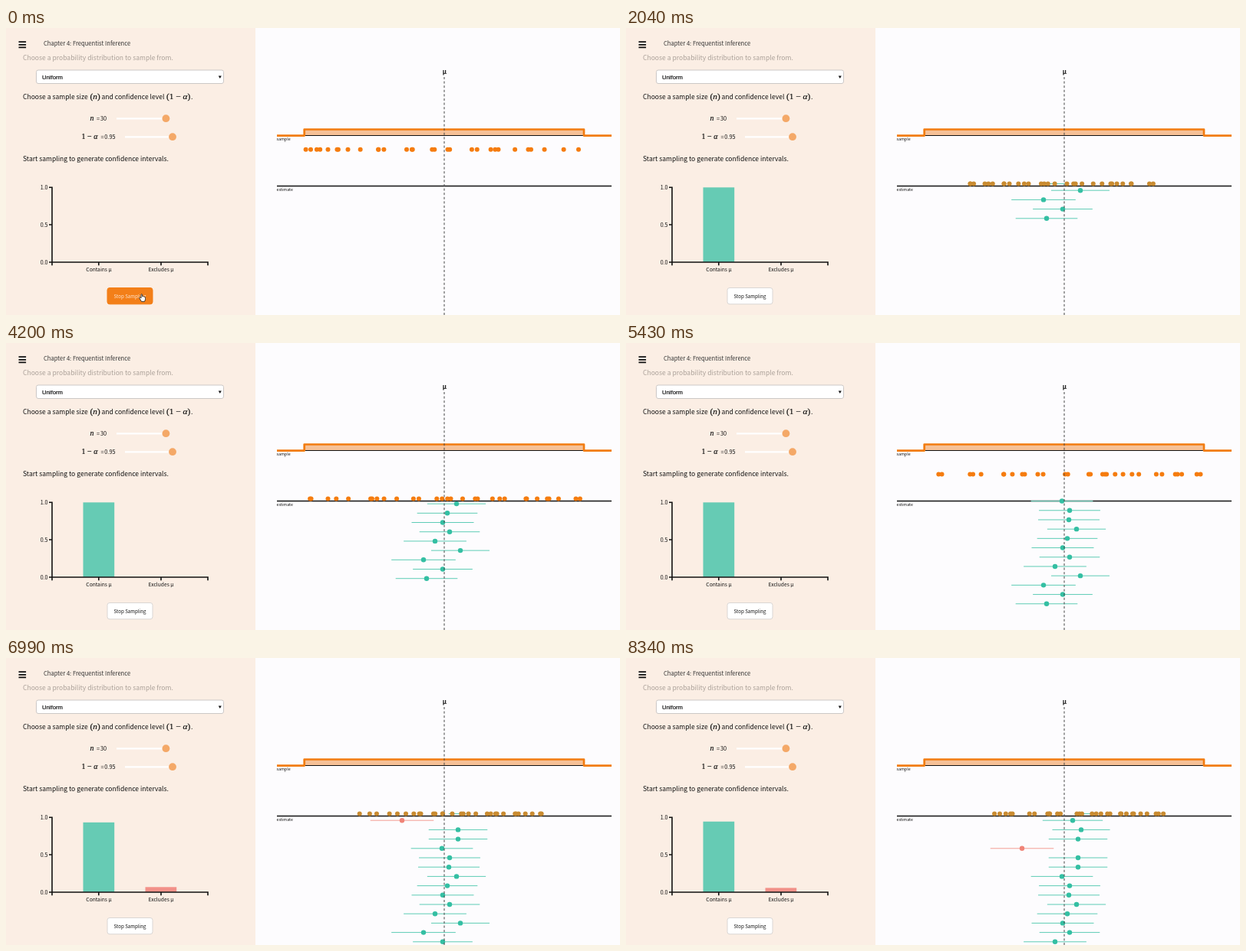
Write an HTML page with a canvas that moves like this. It is 800 px wide and 375 px high and loops after 8370 ms.

```html
<!DOCTYPE html>
<html lang="en">
<head>
<meta charset="utf-8">
<title>Confidence intervals</title>
<style>
html, body { margin: 0; width: 100%; height: 100%; overflow: hidden; background: #fdfcfe; }
svg, canvas { position: absolute; left: 0; top: 0; width: 800px; height: 375px; }
text { font: 500 8.57px 'Noto Sans CJK SC', 'Noto Sans CJK JP', 'Noto Sans', sans-serif; fill: #111; }
.light { font-weight: 400; }
.math { font: 11.3px 'Liberation Serif', serif; stroke: #111; stroke-width: .2; }
.math .v { font-style: italic; }
.value { font-size: 7.3px; word-spacing: -.8px; }
.tick { font-size: 7.1px; }
.small { font-size: 6.7px; }
.tiny { font-size: 5.3px; }
.mid { text-anchor: middle; }
.end { text-anchor: end; }
.line { fill: none; stroke: #111; stroke-width: 1.6; }
</style>
</head>
<body>
<svg viewBox="0 0 800 375">
  <rect width="325" height="375" fill="#fbeee4"/>
  <path d="M16.5 18.2h9.6m-9.6 3.6h9.6m-9.6 3.6h9.6" class="line" style="stroke-width:1.8"/>
  <text x="49" y="23.4" class="light" style="font-size:7.6px;fill:#333">Chapter 4: Frequentist Inference</text>
  <text x="22" y="41.5" class="light" style="fill:#aba199">Choose a probability distribution to sample from.</text>
  <rect x="39.5" y="55" width="244" height="17.5" rx="2.5" fill="#fff" stroke="#ccc8c6"/>
  <text x="47" y="66.5" style="font:7.7px 'Liberation Sans',sans-serif;stroke:#111;stroke-width:.2">Uniform</text>
  <path d="M276.8 62.6h4l-2 3.4z" fill="#111"/>

  <text x="22" y="93">Choose a sample size</text>
  <text x="109.6" y="93.3" class="math">(<tspan class="v">n</tspan>)</text>
  <text x="124.5" y="93">and confidence level</text>
  <text x="209" y="93.3" class="math">(1 − <tspan class="v">α</tspan>)</text>
  <text x="241" y="93">.</text>
  <text x="109.5" y="121" class="math" style="font-size:10px"><tspan class="v">n</tspan></text>
  <text x="131" y="120.8" class="value end">= 30</text>
  <text x="98.5" y="145" class="math" style="font-size:10px">1 − <tspan class="v">α</tspan></text>
  <text x="142.5" y="144.6" class="value end">= 0.95</text>
  <path d="M144 118.3h64M155 142.3h62" stroke="#fff" stroke-width="2.2"/>
  <circle cx="208.4" cy="118.2" r="4.9" fill="#f4a867"/>
  <circle cx="217" cy="142.2" r="4.9" fill="#f4a867"/>
  <text x="22" y="174">Start sampling to generate confidence intervals.</text>

  <rect id="hit" x="100.5" width="40.7" fill="#66cbb4"/>
  <rect id="miss" x="181.5" width="40.7" fill="#f39189"/>
  <path class="line" d="M56 208.3h4V306M56 257h4M56 306H263v4.3M60 306v4.3M120.8 306v4.3M202 306v4.3"/>
  <text x="54.5" y="210.8" class="tick end">1.0</text>
  <text x="54.5" y="259.6" class="tick end">0.5</text>
  <text x="54.5" y="308.6" class="tick end">0.0</text>
  <text x="121" y="318" class="small mid">Contains µ</text>
  <text x="202" y="318" class="small mid">Excludes µ</text>

  <rect id="button" x="132" y="339.5" width="59" height="21.3" rx="3"/>
  <text id="label" x="161.5" y="352.6" class="mid" style="font-size:6.15px">Stop Sampling</text>
  <path id="hand" d="M173.6 352.5l1.2-.8 1.2 1.2v-4.6q.8-1.2 1.6 0v2.5q1-.7 1.5.2 1-.5 1.4.4 1-.2 1.1.8v2.6l-1.1 2.6h-4z" fill="#fff" stroke="#111" stroke-width=".8"/>

  <path d="M388.5 140.5v-8H753v8z" fill="#f6c197"/>
  <path d="M353 140.5H789" stroke="#111"/>
  <path d="M353 140.6h35.7v-8.1H753v8.1h36" fill="none" stroke="#f27c10" stroke-width="2.7" stroke-linejoin="round"/>
  <path class="line" d="M353 206.5H789"/>
  <text x="352.5" y="147" class="tiny">sample</text>
  <text x="352.5" y="212.5" class="tiny">estimate</text>
  <text x="571.3" y="59.5" class="mid" style="font-size:8px;font-weight:700">µ</text>
</svg>
<canvas id="stage" width="800" height="375"></canvas>
<script>
const LOOP = 8370, PERIOD = 450, LEAD = 115;
const FALL = 203, SHIFT = 345, MERGE = 312, MERGE_LEN = 138;
const LEFT = 389, WIDTH = 364, MU = 571, SIZE = 30, STEP = 12.2, REST = 203.5;
const ORANGE = [245, 124, 15], TEAL = [52, 191, 163], RED = [240, 132, 120], WHITE = [255, 255, 255];
const $ = id => document.getElementById(id);
const ctx = $('stage').getContext('2d');
const clamp = v => Math.max(0, Math.min(1, v));
const mix = (a, b, f) => `rgb(${a.map((v, k) => Math.round(v + (b[k] - v) * f))})`;

function random(seed) {
  const v = Math.sin(seed * 12.9898) * 43758.5453;
  return v - Math.floor(v);
}

// Jittered uniform draws, bent by a power so that they average to the mean;
// the 95% interval follows from their spread.
function makeSample(mean, i) {
  const power = WIDTH / (mean - LEFT) - 1;
  const xs = Array.from({ length: SIZE }, (_, k) => {
    const u = (k + .5 + 2.5 * (random(i * 31 + k + 1) - .5)) / SIZE;
    return LEFT + WIDTH * Math.max(.015, Math.min(.985, u)) ** power;
  });
  const variance = xs.reduce((sum, x) => sum + (x - mean) ** 2, 0) / (SIZE - 1);
  const half = 2.045 * Math.sqrt(variance / SIZE);
  const hit = Math.abs(mean - MU) < half;
  return { mean, xs, half, hit, tone: hit ? TEAL : RED };
}

const samples = [548, 569, 544, 592, 559, 578, 569, 575, 587, 577, 578, 568, 589, 589, 516, 589, 593, 582, 596]
  .map(makeSample);

function dot(x, y, r) {
  ctx.beginPath();
  ctx.arc(x, y, r, 0, 7);
  ctx.fill();
}

function line(x1, y1, x2, y2) {
  ctx.beginPath();
  ctx.moveTo(x1, y1);
  ctx.lineTo(x2, y2);
  ctx.stroke();
}

function drawInterval({ mean, half, tone }, y, grow) {
  ctx.strokeStyle = mix(tone, WHITE, .2);
  line(mean - half * grow, y, mean + half * grow, y);
}

function drawBars(n, q) {
  const f = clamp(q / 200), ease = f * f * (3 - 2 * f);
  const share = (count, hit) => samples.slice(0, count).filter(s => s.hit === hit).length / Math.max(1, count);
  for (const [id, hit] of [['hit', true], ['miss', false]]) {
    const before = share(n - 1, hit), after = share(n, hit);
    const height = n ? 97.5 * (before + (after - before) * ease) : 0;
    $(id).setAttribute('y', 305.8 - height);
    $(id).setAttribute('height', height);
  }
}

function drawButton(t) {
  const away = clamp((t - 450) / 400) ** 2, fade = clamp((t - 700) / 250);
  $('button').setAttribute('fill', mix([243, 127, 24], WHITE, fade));
  $('button').setAttribute('stroke', mix([243, 127, 24], [218, 214, 212], fade));
  $('label').style.fill = mix([255, 232, 212], [17, 17, 17], fade);
  $('hand').setAttribute('transform', `translate(${14 * away} ${32 * away})`);
}

function draw(t) {
  const n = Math.floor((t + LEAD) / PERIOD), q = (t + LEAD) % PERIOD;
  const current = samples[n];
  ctx.clearRect(0, 0, 800, 375);
  ctx.lineWidth = 1;

  const shift = clamp(q / SHIFT) ** .72;
  samples.slice(0, n).forEach((s, k) => {
    const y = Math.max(REST, 200 + STEP * (n - k - 1 + shift));
    drawInterval(s, y, 1);
    ctx.fillStyle = mix(s.tone, s.tone, 0);
    dot(s.mean, y, 3.2);
  });

  const merge = clamp((q - MERGE) / MERGE_LEN);
  const y = 137 + (REST - 137) * clamp(q / FALL) ** 2;
  if (merge) drawInterval(current, y, merge);
  ctx.fillStyle = mix(ORANGE, current.tone, merge ** 1.3);
  for (const x of current.xs) dot(x + (current.mean - x) * merge, y, 3);

  ctx.strokeStyle = '#444';
  ctx.setLineDash([3, 2.6]);
  line(571, 64, 571, 375);
  ctx.setLineDash([]);

  drawBars(n, q);
  drawButton(t);
}

const begin = performance.now();
function frame() {
  draw((performance.now() - begin) % LOOP);
  requestAnimationFrame(frame);
}
frame();
</script>
</body>
</html>
```
